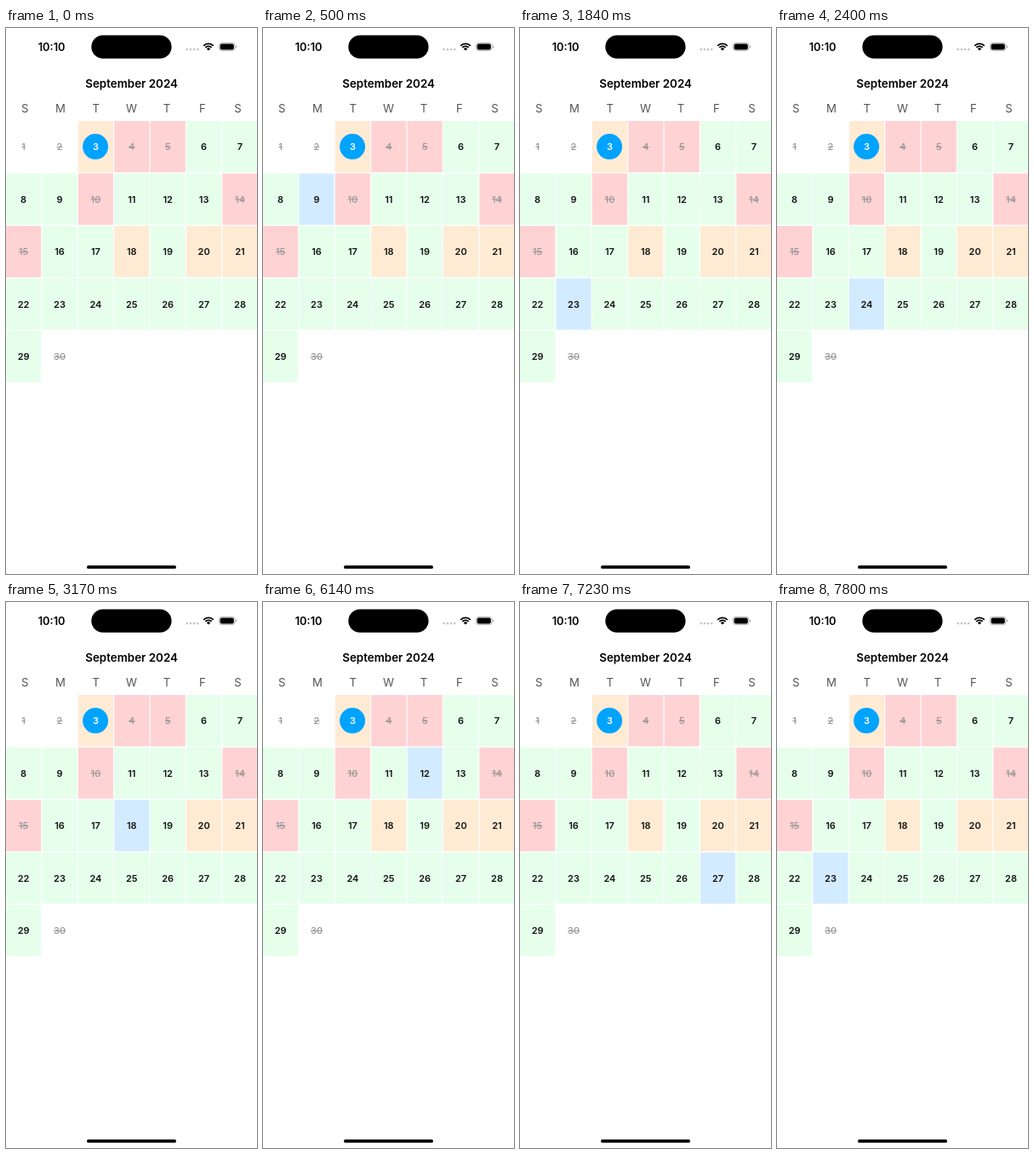
These frames come from a looping animation (295x640 px, 8000 ms). An HTML page with a canvas:

```html
<!DOCTYPE html>
<html lang="en">
<head>
<meta charset="utf-8">
<title>Calendar</title>
<style>
  html, body { margin: 0; width: 100%; height: 100%; overflow: hidden; background: #fff; }
  canvas { display: block; width: 295px; height: 640px; }
</style>
</head>
<body>
<canvas id="stage"></canvas>
<script>
const W = 295, H = 640, LOOP = 8000;
const canvas = document.getElementById('stage');
const ctx = canvas.getContext('2d');
const dpr = window.devicePixelRatio || 1;
canvas.width = Math.round(W * dpr);
canvas.height = Math.round(H * dpr);

const FONT = 'Inter, "Liberation Sans", sans-serif';
const GREEN = '#e5ffeb', RED = '#ffd2d4', ORANGE = '#ffebd4', BLUE = '#d3ebff';
const GREY = '#969696';
const CELL = { x: 42.4, y: 61.5, w: 41.2, h: 60.2, top: 109 };
const TODAY = 3;
const blank = [1, 2, 30];
const booked = [4, 5, 10, 14, 15];
const partial = [3, 18, 20, 21];

// [start time, selected day]
const taps = [
  [0, 0], [500, 9], [1150, 16], [1840, 23], [2400, 24],
  [3170, 18], [6140, 12], [6680, 20], [7230, 27], [7800, 23]
];

function text(str, x, y, size, weight, color) {
  ctx.font = `${weight} ${size}px ${FONT}`;
  ctx.fillStyle = color;
  ctx.fillText(str, x, y + size * 0.364);
}

function pill(x, y, w, h, r, color) {
  ctx.beginPath();
  ctx.roundRect(x, y, w, h, r);
  ctx.fillStyle = color;
  ctx.fill();
}

function disc(x, y, r, color) {
  ctx.beginPath();
  ctx.arc(x, y, r, 0, Math.PI * 2);
  ctx.fillStyle = color;
  ctx.fill();
}

function drawWifi(x, y) {
  const from = -Math.PI * 0.75, to = -Math.PI * 0.25;
  ctx.strokeStyle = '#000';
  ctx.lineWidth = 1.9;
  for (const r of [8.2, 5.2]) {
    ctx.beginPath();
    ctx.arc(x, y, r, from, to);
    ctx.stroke();
  }
  ctx.beginPath();
  ctx.moveTo(x, y);
  ctx.arc(x, y, 3.1, from, to);
  ctx.fillStyle = '#000';
  ctx.fill();
}

function drawStatus() {
  text('10:10', 53.6, 22, 12.8, 600, '#000');
  pill(100.3, 8.4, 94.3, 27.4, 13.7, '#000');
  for (let i = 0; i < 4; i++) disc(212.7 + i * 4.2, 25.1, 1.35, '#c4c4c4');
  drawWifi(238, 26.6);
  ctx.beginPath();
  ctx.roundRect(250.4, 17.4, 18.6, 9.2, 3);
  ctx.strokeStyle = '#a6a6a6';
  ctx.lineWidth = 0.8;
  ctx.stroke();
  pill(251.6, 18.6, 16.2, 6.8, 1.9, '#000');
  pill(269.9, 20.4, 1.1, 3.2, 0.6, '#a6a6a6');
}

function fillFor(day, selected) {
  if (day === selected) return BLUE;
  if (blank.includes(day)) return null;
  if (booked.includes(day)) return RED;
  return partial.includes(day) ? ORANGE : GREEN;
}

function drawDay(day, selected) {
  const x = (day - 1) % 7 * CELL.x;
  const y = CELL.top + Math.floor((day - 1) / 7) * CELL.y;
  const cx = x + CELL.w / 2, cy = y + CELL.h / 2;
  const fill = fillFor(day, selected);
  if (fill) {
    ctx.fillStyle = fill;
    ctx.fillRect(x, y, CELL.w, CELL.h);
  }
  if (day === TODAY) disc(cx - 0.3, cy, 15, '#00a3ff');

  const off = blank.includes(day) || booked.includes(day);
  const color = day === TODAY ? '#fff' : off ? GREY : '#111';
  text(day, cx, cy, 11, off ? 500 : 600, color);
  if (off) {
    const w = ctx.measureText(day).width;
    ctx.fillRect(cx - w / 2, cy - 0.2, w, 1);
  }
}

function draw(time) {
  const selected = taps.findLast(([start]) => start <= time)[1];
  ctx.setTransform(dpr, 0, 0, dpr, 0, 0);
  ctx.fillStyle = '#fff';
  ctx.fillRect(0, 0, W, H);
  ctx.textAlign = 'center';

  drawStatus();
  text('September 2024', 147.6, 64.8, 13.4, 600, '#000');
  [...'SMTWTFS'].forEach((name, i) => text(name, 22.3 + i * 41.7, 94, 13.2, 400, '#555'));
  for (let day = 1; day <= 30; day++) drawDay(day, selected);
  pill(95, 630, 105, 3.8, 1.9, '#000');
}

const begin = performance.now();
function tick() {
  draw((performance.now() - begin) % LOOP);
  requestAnimationFrame(tick);
}
tick();
</script>
</body>
</html>
```
